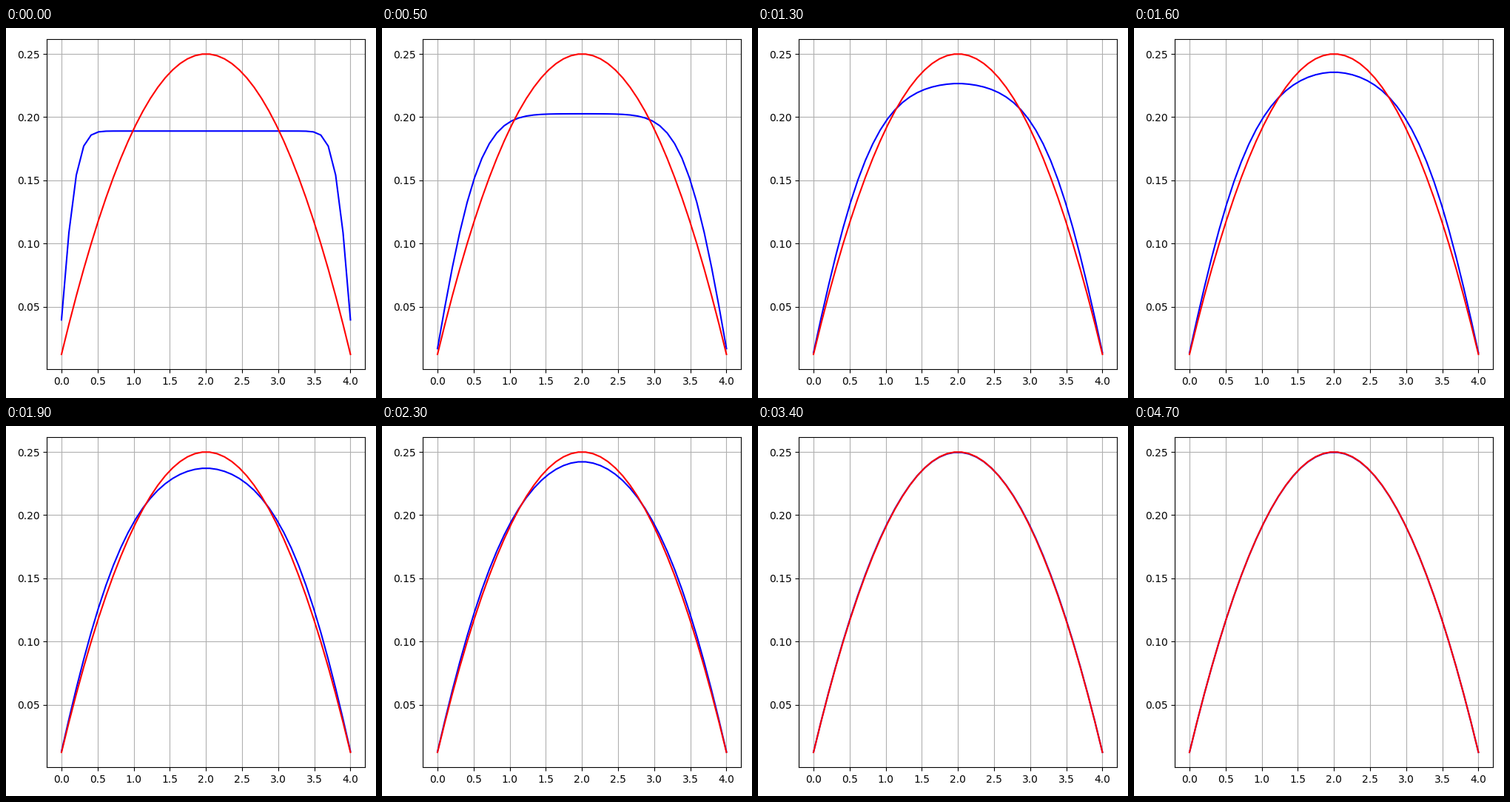
A matplotlib script that plays this animation: 500x500 px, repeating every 4.8 s.

```python
import math

import matplotlib.pyplot as plt
import numpy as np
from matplotlib.animation import FuncAnimation

FRAMES = 48
POINTS = 40
PEAK = 0.25

x = np.linspace(0, 4, POINTS)
height = (np.arange(POINTS) + 0.5) / (POINTS / 2)
wall = np.minimum(height, 2 - height)  # distance to the nearest wall
parabola = 1 - (1 - wall) ** 2
erf = np.vectorize(math.erf)

# Shortfall of the core speed, decaying towards the developed flow.
GAP_TIMES = [0, 5, 13, 19, 23, 28, 34, 47]
GAPS = [0.0695, 0.044, 0.0215, 0.0117, 0.0069, 0.0028, 0.0006, 0.0001]

# Squared thickness of the wall layer, growing by diffusion.
LAYER_TIMES = [0, 5, 10, 13]
LAYERS = [0.0177, 0.114, 0.195, 0.2025]


def pulse(step):
    """Damped pressure wave that flips sign on every step."""
    size = 0.025 * math.exp(-step / 11.5) + 0.022 * math.exp(-step)
    return 1 + size * (-1) ** step


def profile(step):
    """Speed across the channel: a wall layer that turns into a parabola."""
    gap = math.exp(np.interp(step, GAP_TIMES, np.log(GAPS)))
    thickness = math.sqrt(np.interp(step, LAYER_TIMES, LAYERS))
    layer = erf(wall / thickness) / math.erf(1 / thickness)
    mix = min(1, 37 * gap)
    shape = mix * layer + (1 - mix) * parabola
    return (PEAK - gap) * pulse(step) * shape


fig, ax = plt.subplots(figsize=(5, 5), dpi=100)
flow, = ax.plot(x, profile(0), "b")
ax.plot(x, PEAK * parabola, "r")
ax.grid()
fig.tight_layout()


def update(step):
    flow.set_ydata(profile(step))
    return flow,


anim = FuncAnimation(fig, update, frames=FRAMES, interval=100, repeat=True)
plt.show()
```
